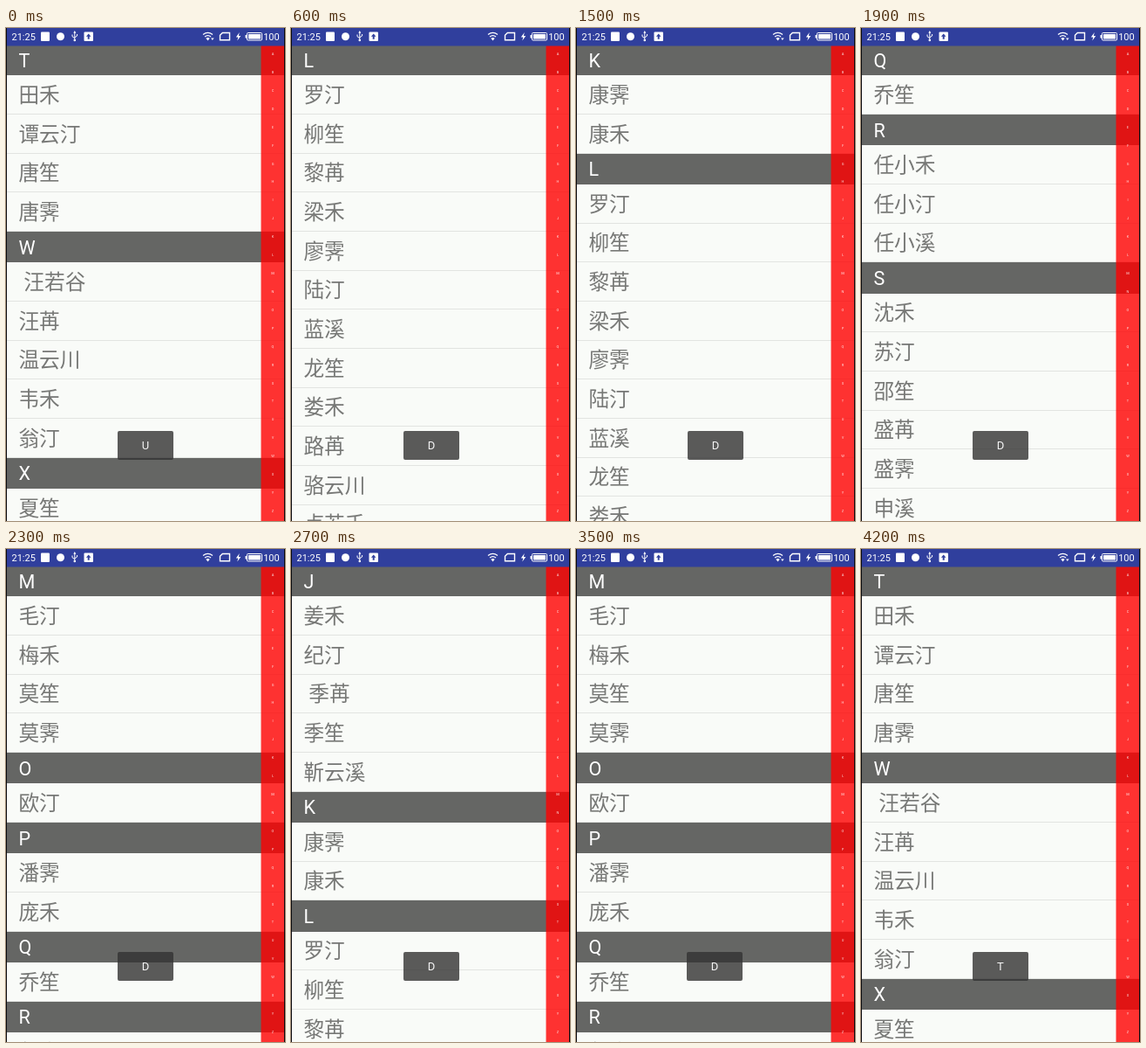
Animation, 320 px wide and 564 px high, one loop 4300 ms. Source, as an HTML page:

```html
<!DOCTYPE html>
<html lang="zh-CN">
<head>
<meta charset="utf-8">
<title>字母索引列表</title>
<style>
html, body { margin: 0; width: 100%; height: 100%; overflow: hidden; background: #000; }
#stage {
  position: relative; width: 320px; height: 564px; overflow: hidden;
  background: #f9fbf8; font-family: Roboto, "Noto Sans CJK SC", "Noto Sans CJK", sans-serif;
}
#list { position: absolute; left: 0; width: 320px; }
.head, .row {
  position: absolute; left: 0; width: 320px; box-sizing: border-box;
  padding: 1.8px 0 0 14.4px; white-space: pre;
}
.head { height: 35.3px; line-height: 34px; font-size: 21.6px; color: #fff; background: #656664; }
.row { height: 44.67px; line-height: 43px; font-size: 23.7px; color: #777876; border-bottom: 1px solid #e2e4e1; }
#index {
  position: absolute; left: 292px; top: 20px; width: 27px; height: 544px;
  background: rgba(255, 0, 0, .8) padding-box; border-left: 1px solid rgba(255, 0, 0, .4);
}
#index span {
  position: absolute; left: 0; width: 26px; text-align: center;
  font-size: 4px; line-height: 6px; color: rgba(255, 255, 255, .85);
}
#toast {
  position: absolute; top: 461px; width: 64px; height: 32.5px; border-radius: 2px;
  background: rgba(50, 50, 50, .8); color: #f4f4f4;
  font-size: 13px; line-height: 33.5px; text-align: center;
}
#bar { position: absolute; left: 0; top: 0; }
#bar text { font: 11px Roboto, sans-serif; fill: #fff; }
.edge { position: absolute; top: 0; width: 1px; height: 564px; background: #0a0a0e; }
</style>
</head>
<body>
<div id="stage">
  <div id="list"></div>
  <div id="index"></div>
  <div id="toast"></div>
  <svg id="bar" width="320" height="21" fill="#fff">
    <rect width="320" height="20.5" fill="#303f9d"/>
    <text x="6.5" y="13.8">21:25</text>
    <rect x="40" y="4.5" width="10" height="10.5" rx="1"/>
    <circle cx="62.5" cy="9.7" r="4.5"/>
    <g fill="none" stroke="#fff">
      <path d="M78.8 4.5V14M76 7.5v2.2l2.8 2M81.6 7v2l-2.8 1.8"/>
      <path d="M226 7.6q5.5-4.4 11 0M228 10q3.5-2.8 7 0" stroke-width="1.3"/>
      <path d="M248.3 5.5H256.5V13.8H245.5V8.3Z" stroke-width="1.4"/>
      <rect x="276.5" y="5.5" width="17" height="8.5" rx="1"/>
    </g>
    <path d="M77.3 5.8l1.5-2.8 1.5 2.8z"/>
    <circle cx="78.8" cy="14" r="1.3"/>
    <rect x="89.5" y="4.5" width="10.5" height="10.5" rx="1"/>
    <path d="M94.7 6.5l2.8 3.2h-1.8v3h-2v-3h-1.8z" fill="#303f9d"/>
    <path d="M229.3 11.8q2.2-1.8 4.4 0l-2.2 2.6z"/>
    <path id="busy" d="M235 11.6h3.6l-1.8 2.4z"/>
    <path d="M267.8 5l-4 5.4h2.5l-1 4 4-5.4h-2.5z"/>
    <rect x="278" y="7" width="14" height="5.5"/>
    <rect x="274.5" y="8" width="1.5" height="3.5"/>
    <text x="295.2" y="13.8">100</text>
  </svg>
  <div class="edge" style="left:0"></div>
  <div class="edge" style="right:0"></div>
</div>
<script>
const LOOP = 4300, TOP = 19, HEAD = 35.3, ROW = 44.67;

const people = {
  D: '狄禾,党沐川,窦苒,东若谷,邸汀,刁青禾,都笙,堵蔚',
  F: '费汀',
  G: '葛云汀,耿禾,甘霁,高若溪,古 笙',
  H: '贺汀,洪思禾,华苒,霍云谷,何清沐,胡霁,杭笙,惠若川',
  J: '姜禾,纪汀, 季苒,季笙,靳云溪',
  K: '康霁,康禾',
  L: '罗汀,柳笙,黎苒,梁禾,廖霁,陆汀,蓝溪,龙笙,娄禾,路苒,骆云川,卢若禾,冷霁',
  M: '毛汀,梅禾,莫笙,莫霁',
  O: '欧汀',
  P: '潘霁,庞禾',
  Q: '乔笙',
  R: '任小禾,任小汀,任小溪',
  S: '沈禾,苏汀,邵笙,盛苒,盛霁,申溪,舒禾,司汀,宿笙,桑若禾,尚霁,佘苒',
  T: '田禾,谭云汀,唐笙,唐霁',
  W: ' 汪若谷,汪苒,温云川,韦禾,翁汀',
  X: '夏笙,薛汀'
};

// [start in ms, section at the top]
const jumps = [
  [0, 'T'], [100, 'R'], [200, 'Q'], [300, 'P'], [400, 'O'], [500, 'M'], [600, 'L'],
  [700, 'J'], [800, 'H'], [900, 'G'], [1000, 'D'], [1100, 'F'], [1200, 'G'],
  [1300, 'H'], [1400, 'J'], [1500, 'K'], [1600, 'L'], [1700, 'M'], [1800, 'P'],
  [1900, 'Q'], [2100, 'P'], [2200, 'O'], [2300, 'M'], [2500, 'L'], [2600, 'K'],
  [2700, 'J'], [2800, 'H'], [2900, 'G'], [3000, 'F'], [3100, 'D'], [3200, 'G'],
  [3300, 'J'], [3400, 'L'], [3500, 'M'], [3600, 'P'], [3700, 'Q'], [3800, 'S'], [3900, 'T']
];
// [start in ms, letter, left]
const toasts = [
  [0, 'U', 128], [600, 'D', 129], [1500, 'D', 128], [2500, 'D', 129], [3000, 'D', 128],
  [3400, 'D', 127], [3900, 'D', 128], [4200, 'T', 128]
];
// [start in ms, opacity of the wifi activity mark]
const activity = [[0, 1], [600, 0], [1500, 1], [2300, 0], [3300, 1]];

const $ = id => document.getElementById(id);
const list = $('list'), toast = $('toast'), busy = $('busy');
const offset = {};

function add(parent, tag, cls, text, top) {
  const el = document.createElement(tag);
  el.className = cls;
  el.textContent = text;
  el.style.top = top + 'px';
  parent.append(el);
}

let y = 0;
for (const [letter, names] of Object.entries(people)) {
  offset[letter] = y;
  add(list, 'div', 'head', letter, y);
  y += HEAD;
  for (const name of names.split(',')) {
    add(list, 'div', 'row', name, y);
    y += ROW;
  }
}
for (let i = 0; i < 26; i++) {
  add($('index'), 'span', '', String.fromCharCode(65 + i), 7 + i * 20.92);
}

const at = (steps, t) => steps.findLast(s => s[0] <= t);

const start = performance.now();
function draw() {
  const t = Math.max(0, performance.now() - start) % LOOP;
  list.style.top = TOP - offset[at(jumps, t)[1]] + 'px';
  const [, letter, left] = at(toasts, t);
  toast.textContent = letter;
  toast.style.left = left + 'px';
  busy.style.opacity = at(activity, t)[1];
  requestAnimationFrame(draw);
}
draw();
</script>
</body>
</html>
```
